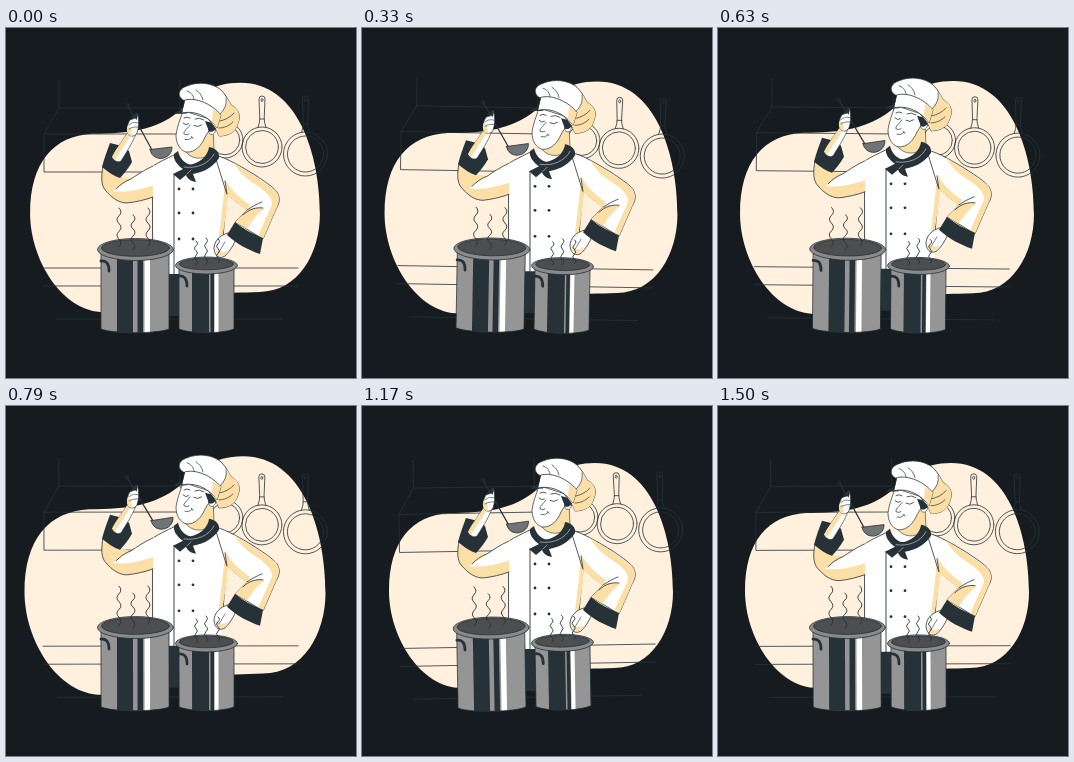
Recreate the animation shown at these times as an HTML page with a canvas. Size 350 px wide and 350 px high, loop 1.54 s.

```html
<!DOCTYPE html>
<html lang="en">
<head>
<meta charset="utf-8">
<title>Chef tasting</title>
<style>
  html, body { margin: 0; width: 100%; height: 100%; overflow: hidden; background: #151b1e; }
  canvas { display: block; width: 350px; height: 350px; }
</style>
</head>
<body>
<canvas id="stage"></canvas>
<script>
const LOOP = 1540;
const INK = '#263238', CREAM = '#fff1de', SHADE = '#fbdfa6', WHITE = '#ffffff';
const canvas = document.getElementById('stage');
const ctx = canvas.getContext('2d');
const ratio = window.devicePixelRatio || 1;
canvas.width = canvas.height = 350 * ratio;

const clamp = v => Math.max(0, Math.min(1, v));

function shape(d, fill, stroke, width = 0.8) {
  const path = new Path2D(d);
  if (fill) { ctx.fillStyle = fill; ctx.fill(path); }
  if (stroke) { ctx.strokeStyle = stroke; ctx.lineWidth = width; ctx.stroke(path); }
}
const line = (d, width = 0.8) => shape(d, null, INK, width);

function oval(x, y, rx, ry, fill, stroke, width = 0.8) {
  ctx.beginPath();
  ctx.ellipse(x, y, rx, ry, 0, 0, Math.PI * 2);
  if (fill) { ctx.fillStyle = fill; ctx.fill(); }
  if (stroke) { ctx.strokeStyle = stroke; ctx.lineWidth = width; ctx.stroke(); }
}

function about(x, y, { turn = 0, scale = 1, lift = 0 }, draw) {
  ctx.save();
  ctx.translate(x, y - lift);
  ctx.rotate(turn * Math.PI / 180);
  ctx.scale(scale, scale);
  ctx.translate(-x, -y);
  draw();
  ctx.restore();
}

// Two quick beats, then a rest
function beat(t) {
  const p = (t + 30) / 1520;
  const rise = (start, peak, end) =>
    p < peak ? clamp((p - start) / (peak - start)) : clamp((end - p) / (end - peak));
  return 1 + 0.1 * (rise(0, 0.1, 0.3) + rise(0.4, 0.5, 0.6));
}

function blob() {
  shape('M27 185C27 135 50 109 88 107C125 107 150 103 172 86C190 70 205 57 233 57' +
    'C290 57 311 128 311 186C311 224 290 262 252 262C215 263 190 264 165 270' +
    'C140 277 120 282 100 282C58 282 27 230 27 185Z', CREAM);
}

function pan(x, y, r, top) {
  oval(x, y, r, r, null, INK);
  oval(x, y, r * 0.82, r * 0.82, null, INK);
  if (top === undefined) return;
  const low = y - r;
  line(`M${x - 4} ${low + 0.5}Q${x - 2} ${low - 5} ${x - 2.2} ${low - 9}L${x - 3} ${top + 3}` +
    `Q${x - 3} ${top} ${x} ${top}Q${x + 3} ${top} ${x + 3} ${top + 3}` +
    `L${x + 2.2} ${low - 9}Q${x + 2} ${low - 5} ${x + 4} ${low + 0.5}`);
  line(`M${x - 2.2} ${low - 8}H${x + 2.2}`);
  oval(x, top + 4, 1, 1.6, null, INK, 0.7);
}

function kitchen() {
  line('M53 52V80H174V52M53 80L38 106V144H190M38 106H190L174 80');
  line('M37 240H292M37 258H292M51 291H277');
  pan(219, 112, 18);
  pan(256, 119, 20, 68);
  pan(299.5, 126, 22, 68);
}

function torso() {
  shape('M160 240H218V288H160Z', INK);
  shape('M168 127C160 131 153 134 147 138L147 170C148 195 148 220 149 246H215L217 205' +
    'C219 190 220 178 221 166L212 126Z', WHITE);
  line('M146.5 140V246M168 127C160 131 153 134 147 138M221 166C220 180 218 195 217 210');
  shape('M219 155C217 175 215 192 213 208L216 210C219 195 221 180 222 166Z', SHADE);
  line('M168 146V246', 0.9);
  for (const y of [161, 185, 211])
    for (const x of [173, 187]) oval(x, y, 1.4, 1.4, INK);
}

function hipArm() {
  shape('M222 205C214 207 208 213 208 221C209 229 214 231 219 228C225 222 228 216 230 211Z', WHITE, INK);
  shape('M209 220C210 228 214 230 219 227L222 222C217 225 213 225 209 220Z', SHADE);
  line('M213 224L219 214', 0.6);
  shape('M209 127C221 130 236 139 249 147C258 153 266 158 271 164C275 171 273 176 270 181' +
    'L257 211L229 194L241 182C234 177 227 171 221 166Z', WHITE, INK);
  shape('M228 135C236 140 253 150 269 162C275 168 273 175 270 181L257 211L252 208' +
    'L266 177C267 170 259 162 247 155C240 150 233 144 228 135Z', SHADE);
  shape('M219 150C223 160 232 169 244 177L241 183L221 167Z', SHADE);
  shape('M229 194L241 182C247 179 253 179 258 181C250 187 245 194 241 201Z', SHADE);
  line('M237 187C243 181 251 179 257 180M241 182C247 178 251 176 256 174M221 166L219 153');
  shape('M229 194C237 201 247 206 257 210L254 226C242 222 231 216 221 207Z', INK);
}

function ladle() {
  line('M122 78L146 122', 1.2);
  oval(121.5, 77, 1.6, 1.6, null, INK, 0.9);
  shape('M144 121.5L166 119C166 126 161 130 155 130.5C149 130.5 145 127 144 121.5Z', '#717477', INK);
}

function tastingArm(tilt) {
  shape('M97 138C95 149 95 158 100 163C106 170 113 175 121 175C130 174 139 172 147 169' +
    'L147 137C138 142 131 147 125 151L115 149Z', SHADE);
  shape('M148 137C138 142 131 147 125 151C118 155 112 159 107 163C119 165 134 162 148 157Z', WHITE);
  line('M147 169C139 172 130 174 121 175C113 175 106 170 100 163C95 158 95 149 97 138' +
    'M147 138C138 142 131 147 125 151C119 153 114 157 110 161');
  shape('M104 115C101 123 98 131 96 139C102 144 108 148 114 150C119 145 123 139 126 134' +
    'L123 123L116 118Z', INK);
  shape('M122 104C117 112 110 121 106 129C108 133 112 135 115 133C120 125 126 116 130 106Z', WHITE, INK, 0.6);
  shape('M122 105C117 112 110 121 106 129L109 132C114 124 120 115 125 107Z', SHADE);
  about(128, 95, { turn: tilt }, ladle);
  shape('M124 92C121 97 120 102 122 106C124 109 129 109 131 105C133 99 133 94 132 87' +
    'C131 84 129 85 129 90Z', WHITE, INK, 0.7);
  shape('M121.5 98C120 104 122 108 126 108L125 100Z', SHADE);
  line('M123 97C126 94 129 94 132 95M123 101C126 99 129 99 132 99', 0.6);
  about(128, 91, { turn: tilt }, () => shape('M125 90L130.5 84.5L132 87L130.5 92L129 90Z', INK));
}

function head() {
  shape('M196 106L207 100L208 122C202 131 188 134 180 124Z', SHADE, INK, 0.6);
  shape('M177 83C174 92 171 99 170 107C170 116 174 122 180 124C189 125 196 117 199 109' +
    'L206 98L208 93Z', WHITE, INK, 0.7);
  line('M177 95Q179.5 98 182.5 96M188 97.5Q192 100 195.5 97M178 90Q181 88 184 90M189 91Q193 89 198 92');
  line('M184 97C181 101 177 104 178 106Q181 107.5 183 106M179 111.5Q183 113 186 109.5M185.5 108.5L187 110.5', 0.7);
  oval(206, 102, 3.5, 4.5, WHITE, INK, 0.6);
  shape('M199 93L211 96C211 101 207 105 203 103.5Z', INK);
}

function hat() {
  shape('M168 86C170 83 175 81 183 81L181 85.5Z', INK);
  shape('M179 73C171 70 171 61 181 58C192 53 207 55 215 62C220 67 223 73 225 77' +
    'C233 81 235 88 232 95C230 103 224 108 213 108L210 101L196 83Z', WHITE, INK);
  shape('M221 70C223 73 224 75 225 77C233 81 235 88 232 95C230 103 224 108 213 108' +
    'L210 101L213 87C218 83 221 77 221 70Z', SHADE);
  shape('M179 72C190 69 206 76 215 87L211 100C203 89 190 82 176 85Z', WHITE, INK);
  shape('M207 81C210 83 213 85 215 87L211 100L206 93Z', SHADE);
  line('M188 71C187 66 184 64 181 63M197 72C196 67 193 64 190 62M214 86C219 81 221 76 220 70' +
    'M214 93C219 92 225 89 228 85M213 100C218 100 223 98 227 94', 0.7);
}

function neckerchief() {
  shape('M172 123C174 132 182 138 187 136C196 133 202 127 203 119C210 120 214 125 213 130' +
    'C208 138 199 144 187 146L190 154C184 153 181 150 180 147L174 152L167 146L177 141' +
    'C171 137 167 131 168 126Z', INK);
  shape('M178 139C190 141 203 136 208 126M181 146L185 142', null, WHITE, 0.5);
}

function chef(lift) {
  about(0, 0, { lift }, () => {
    torso();
    hipArm();
    head();
    hat();
    neckerchief();
    tastingArm(-lift * 0.4);
  });
}

function pot({ x, y, rx, ry, left, right, bands, handle }) {
  const body = `M${left} ${y}V301C${left + 12} 306 ${right - 12} 306 ${right} 301V${y}Z`;
  ctx.save();
  ctx.clip(new Path2D(body));
  shape(body, '#959595');
  for (const [from, to, color] of bands) {
    ctx.fillStyle = color;
    ctx.fillRect(from, y, to - from, 90);
  }
  ctx.restore();
  line(body);
  oval(x, y + 1, rx, ry, '#8a8a8a', INK);
  oval(x, y - 0.5, rx - 4, ry - 2.7, '#4c4e50', INK);
  line(`M${left} ${handle}Q${left + 8} ${handle - 1} ${left + 8} ${handle + 10}`, 2.8);
}

function steam(x, top, length, width) {
  const step = length / 5;
  let d = `M${x} ${top}`;
  for (let i = 0; i < 5; i++) {
    const side = i % 2 ? -width : width;
    d += `q${side} ${step / 2} 0 ${step}`;
  }
  line(d, 0.9);
}

function pots() {
  pot({ x: 129.5, y: 220.5, rx: 38, ry: 11, left: 95, right: 163, handle: 233,
    bands: [[111, 127, INK], [131.5, 137, INK], [138.5, 144, WHITE]] });
  pot({ x: 200.5, y: 236.5, rx: 31, ry: 8.5, left: 173, right: 228, handle: 248,
    bands: [[186, 203, INK], [204.5, 208, INK], [208.5, 212.5, WHITE]] });
  steam(113, 180, 39, 4);
  steam(127, 187, 35, 4);
  steam(142, 180, 38, 4);
  steam(190, 213, 24, 3);
  steam(200, 210, 26, 3);
  steam(212, 211, 24, 3);
}

function render(t) {
  const turn = Math.sin(t / LOOP * Math.PI * 2);
  const lift = 6.3 * (1 - Math.abs(1 - 2 * t / LOOP));
  ctx.setTransform(ratio, 0, 0, ratio, 0, 0);
  ctx.lineCap = ctx.lineJoin = 'round';
  ctx.fillStyle = '#151b1e';
  ctx.fillRect(0, 0, 350, 350);
  about(169, 169, { scale: beat(t) }, blob);
  about(179, 172, { turn }, kitchen);
  chef(lift);
  about(161, 242, { turn }, pots);
}

const start = performance.now();
function tick() {
  render((performance.now() - start) % LOOP);
  requestAnimationFrame(tick);
}
tick();
</script>
</body>
</html>
```
